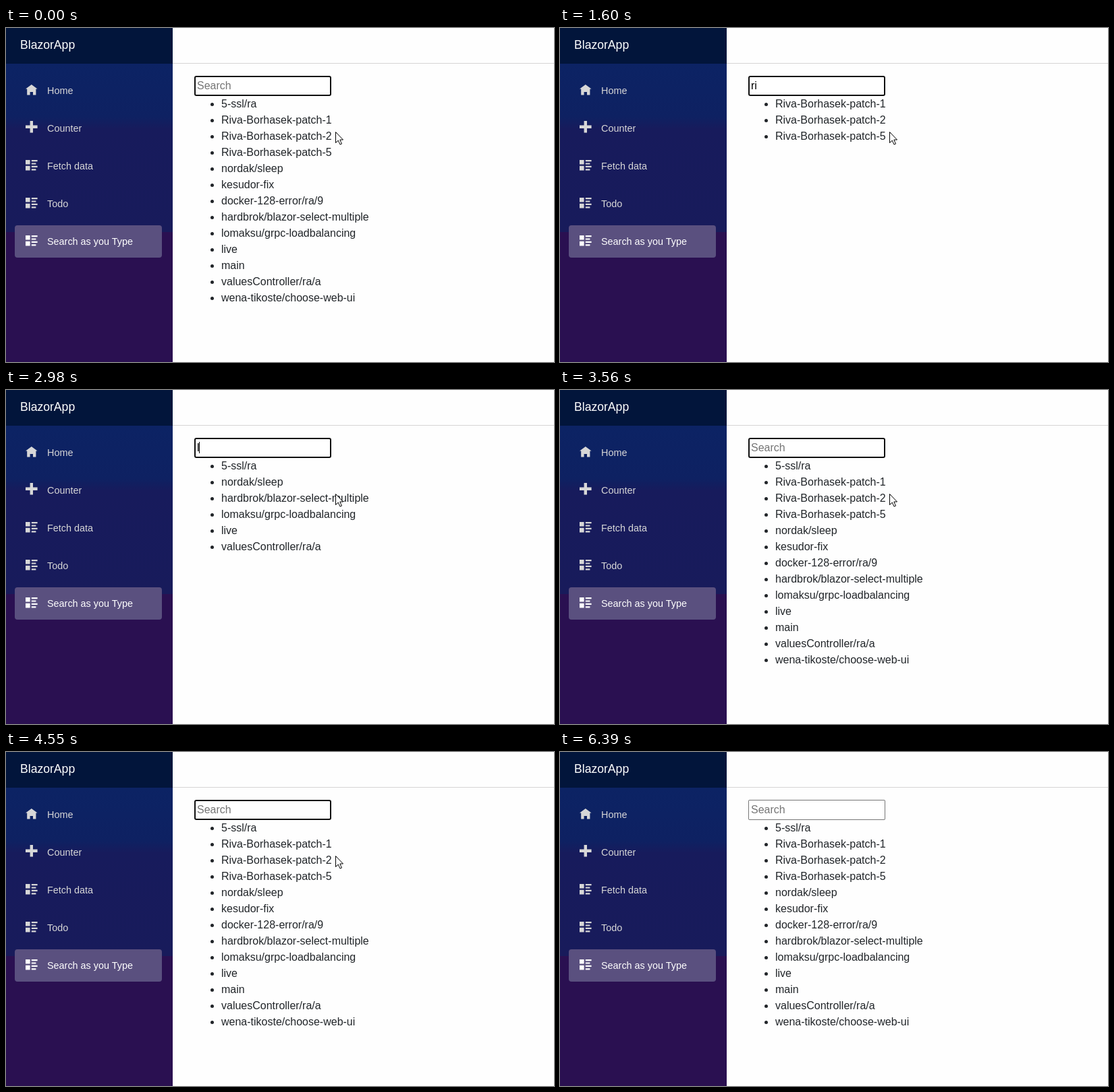
These frames come from a looping animation (812x496 px, 6490 ms). An HTML page:

```html
<!DOCTYPE html>
<html lang="en">
<head>
<meta charset="utf-8">
<title>Search as you Type</title>
<style>
  html, body { margin: 0; width: 100%; height: 100%; overflow: hidden; }
  body { position: relative; background: #fefefe; color: #212529; font: 16px/24px "Liberation Sans", Arial, sans-serif; }
  #sidebar {
    position: absolute; left: 0; top: 0; width: 247px; height: 496px;
    background: linear-gradient(#0c2364 53px, #0e2162 132px, #171b5c 150px, #181b5b 303px, #2a1051 303px);
  }
  #brand {
    position: absolute; left: 0; top: 0; width: 226px; height: 53px; padding-left: 21px;
    background: #02153b; color: #fff; font-size: 17.6px; line-height: 50px;
  }
  #topbar { position: absolute; left: 247px; top: 0; right: 0; height: 52px; border-bottom: 1px solid #d6d5d5; }
  .link {
    position: absolute; left: 13px; width: 170px; height: 48px; padding-left: 48px; border-radius: 4px;
    color: #d7d7d7; fill: currentColor; font-size: 14.4px; line-height: 48px;
  }
  .link.active { background: #5a507f; color: #fff; }
  .link svg { position: absolute; left: 16px; width: 17.6px; height: 17.6px; }
  #field {
    position: absolute; left: 279px; top: 71px; width: 203px; height: 30px; padding: 2.6px 4px;
    box-sizing: border-box; border-radius: 2px; background: #fff; color: #000; box-shadow: inset 0 0 0 1px #767676;
  }
  #field.focus { border-radius: 3px; box-shadow: inset 0 0 0 2px #101010; }
  #query:empty::before { content: "Search"; color: #757575; }
  #caret { position: absolute; top: 6px; width: 1px; height: 17px; background: #000; }
  #branches { position: absolute; left: 279px; top: 100.6px; margin: 0; padding-left: 40px; white-space: nowrap; }
  #pointer { position: absolute; left: 0; top: 0; width: 13px; height: 20px; }
</style>
</head>
<body>
<div id="sidebar"><div id="brand">BlazorApp</div></div>
<div id="topbar"></div>
<div id="field"><span id="query"></span><div id="caret"></div></div>
<ul id="branches"></ul>
<svg id="pointer"><path d="M.5 .5V16.5L4.2 13L7 19L9.5 18L6.8 12H11.5Z" fill="#fff" stroke="#000"/></svg>
<script>
const LOOP = 6490, BLUR = 6390;

const icons = {
  home: 'M4 0l-4 3h1v4h2v-2h2v2h2v-4h1z',
  plus: 'M3 0v3h-3v2h3v3h2v-3h3v-2h-3v-3z',
  list: 'M0 0v3h3v-3zM4 0v1h4v-1zM4 2v1h3v-1zM0 4v3h3v-3zM4 4v1h4v-1zM4 6v1h3v-1z'
};
const links = [['Home', 'home'], ['Counter', 'plus'], ['Fetch data', 'list'],
  ['Todo', 'list'], ['Search as you Type', 'list']];

const branches = ['5-ssl/ra', 'Riva-Borhasek-patch-1', 'Riva-Borhasek-patch-2', 'Riva-Borhasek-patch-5',
  'nordak/sleep', 'kesudor-fix', 'docker-128-error/ra/9', 'hardbrok/blazor-select-multiple',
  'lomaksu/grpc-loadbalancing', 'live', 'main', 'valuesController/ra/a', 'wena-tikoste/choose-web-ui'];

// Each track lists [start time, value].
const typing = [[0, ''], [410, 'r'], [560, 'ri'], [810, 'riv'], [930, 'riva'], [1480, 'riv'], [1600, 'ri'],
  [1880, 'r'], [2300, ''], [2980, 'l'], [3560, ''], [4000, 'm'], [4550, '']];
const blinks = [410, 1480, 2030, 2450, 2980, 3410, 4000, 4550, 5080, 5620, 6110, BLUR];
const pointerPath = [[0, [488, 154]], [5230, [515, 180]], [5500, [558, 246]], [5620, [632, 352]],
  [5740, [713, 478]], [5860, null]];

const $ = id => document.getElementById(id);
const valueAt = (track, t) => track.filter(([start]) => start <= t).pop()[1];

links.forEach(([label, icon], i) => {
  const active = i === links.length - 1 ? ' active' : '';
  const iconTop = icon === 'plus' ? 13.4 : 15;
  $('sidebar').insertAdjacentHTML('beforeend',
    `<div class="link${active}" style="top:${69 + 56 * i}px">
      <svg viewBox="0 0 8 8" style="top:${iconTop}px"><path d="${icons[icon]}"/></svg>${label}</div>`);
});

let shown = null;

function search(text) {
  if (text === shown) return;
  shown = text;
  $('query').textContent = text;
  const width = text ? $('query').getBoundingClientRect().width : 0;
  $('caret').style.left = 4 + Math.floor(width) + 'px';
  $('branches').innerHTML = branches
    .filter(name => name.toLowerCase().includes(text))
    .map(name => `<li>${name}</li>`).join('');
}

function render(t) {
  search(valueAt(typing, t));
  $('field').className = t < BLUR ? 'focus' : '';
  $('caret').hidden = blinks.filter(time => time <= t).length % 2 === 0;
  const position = valueAt(pointerPath, t);
  $('pointer').style.display = position ? '' : 'none';
  if (position) $('pointer').style.transform = `translate(${position[0]}px, ${position[1]}px)`;
}

const start = performance.now();
function tick() {
  render((performance.now() - start) % LOOP);
  requestAnimationFrame(tick);
}
tick();
</script>
</body>
</html>
```
